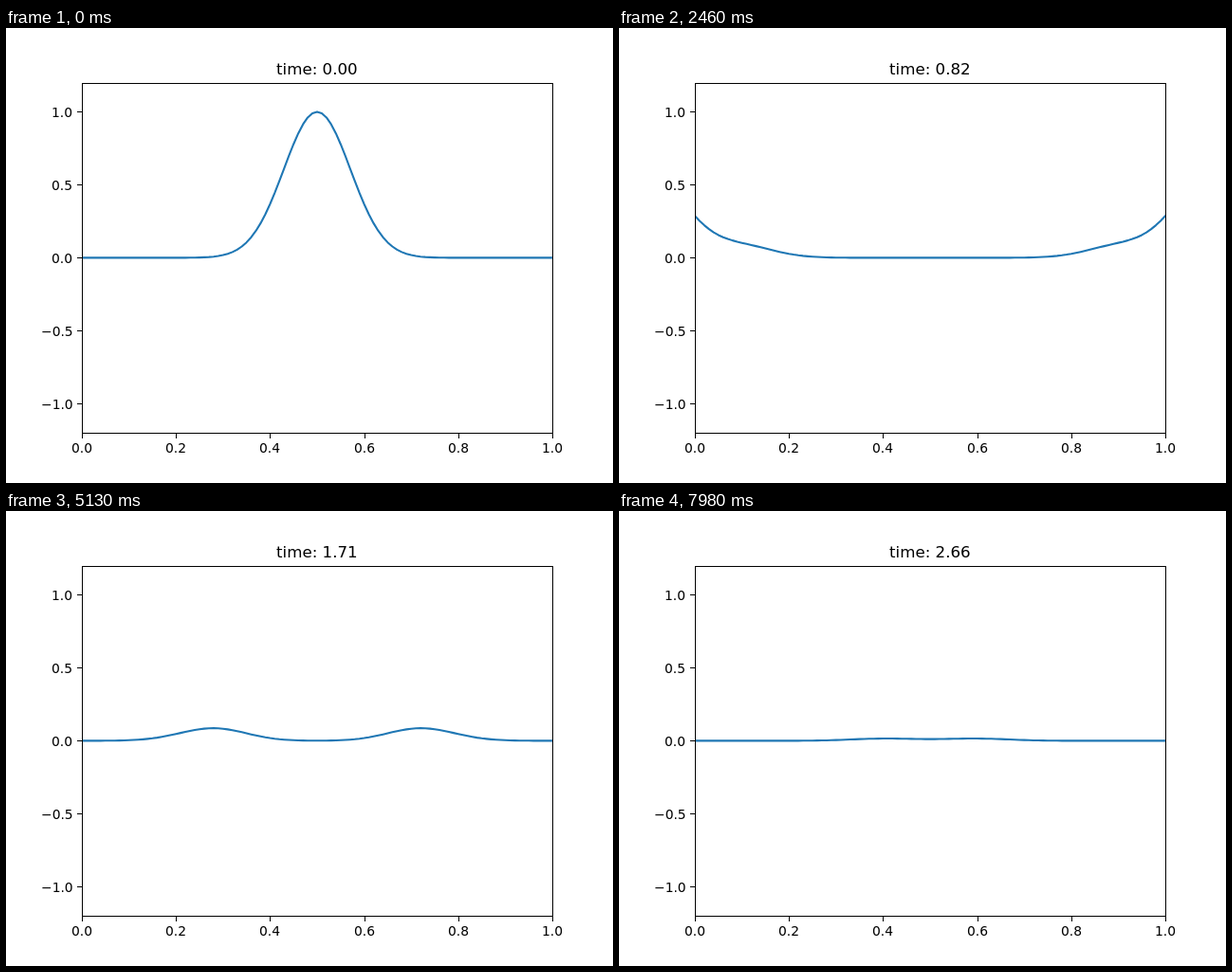
These frames come from a looping animation (640 px wide and 480 px high, 8000 ms). An HTML page with a canvas:

```html
<!DOCTYPE html>
<html lang="en">
<head>
<meta charset="utf-8">
<title>Wave with partly absorbing ends</title>
<style>
  html, body { margin: 0; width: 100%; height: 100%; overflow: hidden; background: #fff; }
  canvas { display: block; }
</style>
</head>
<body>
<canvas id="plot" width="640" height="480"></canvas>
<script>
const ctx = document.getElementById('plot').getContext('2d');

const LOOP_MS = 8000, STEP_MS = 30, DT = 0.01;
const CELLS = 100, COURANT_SQUARED = 0.5;
const AXES = { left: 80, right: 576, top: 57.6, bottom: 427.2 };
const LABEL_PX = 1000 / 72, TITLE_PX = 1200 / 72;

const xToPx = x => AXES.left + x * (AXES.right - AXES.left);
const yToPx = y => (AXES.top + AXES.bottom) / 2 - y * (AXES.bottom - AXES.top) / 2.4;
const pulse = x => Math.exp(-(((x - 0.5) / 0.1) ** 2));

// Leapfrog wave equation; each end copies its neighbour's previous value.
function simulate(count) {
  let previous = Array.from({ length: CELLS + 1 }, (_, i) => pulse(i / CELLS));
  let current = previous;
  const states = [];
  while (states.length < count) {
    states.push(current);
    const next = current.map((u, i) => {
      if (i === 0) return current[1];
      if (i === CELLS) return current[CELLS - 1];
      return 2 * u - previous[i] + COURANT_SQUARED * (current[i - 1] - 2 * u + current[i + 1]);
    });
    previous = current;
    current = next;
  }
  return states;
}

const states = simulate(Math.ceil(LOOP_MS / STEP_MS));

// align: 0.5 centres the text on x, 1 ends it at x.
function drawText(text, x, baseline, size, align) {
  ctx.font = `${size}px "DejaVu Sans", sans-serif`;
  ctx.fillText(text, Math.round(x - align * ctx.measureText(text).width), Math.round(baseline));
}

function drawCurve(values) {
  ctx.save();
  ctx.beginPath();
  ctx.rect(AXES.left, AXES.top, AXES.right - AXES.left, AXES.bottom - AXES.top);
  ctx.clip();
  ctx.beginPath();
  values.forEach((u, i) => ctx.lineTo(xToPx(i / CELLS), yToPx(u)));
  ctx.strokeStyle = '#1f77b4';
  ctx.lineWidth = 150 / 72;
  ctx.lineJoin = 'round';
  ctx.lineCap = 'square';
  ctx.stroke();
  ctx.restore();
}

function drawAxes() {
  const { left, right } = AXES;
  const top = Math.round(AXES.top), bottom = Math.round(AXES.bottom);
  ctx.fillStyle = '#000';
  for (const y of [top, bottom]) ctx.fillRect(left, y, right - left + 1, 1);
  for (const x of [left, right]) ctx.fillRect(x, top, 1, bottom - top + 1);

  for (let i = 0; i <= 5; i++) {
    const x = xToPx(i / 5);
    ctx.fillRect(Math.round(x), bottom + 1, 1, 5);
    drawText((i / 5).toFixed(1), x, 448, LABEL_PX, 0.5);
  }
  for (let i = -2; i <= 2; i++) {
    const y = yToPx(i / 2);
    ctx.fillRect(left - 5, Math.round(y), 5, 1);
    drawText((i / 2).toFixed(1).replace('-', '\u2212'), left - 9.72, y + 5.28, LABEL_PX, 1);
  }
}

function render() {
  const step = Math.floor(performance.now() % LOOP_MS / STEP_MS);
  ctx.fillStyle = '#fff';
  ctx.fillRect(0, 0, 640, 480);
  drawCurve(states[step]);
  drawAxes();
  drawText(`time: ${(step * DT).toFixed(2)}`, (AXES.left + AXES.right) / 2, 49, TITLE_PX, 0.5);
  requestAnimationFrame(render);
}
render();
</script>
</body>
</html>
```
